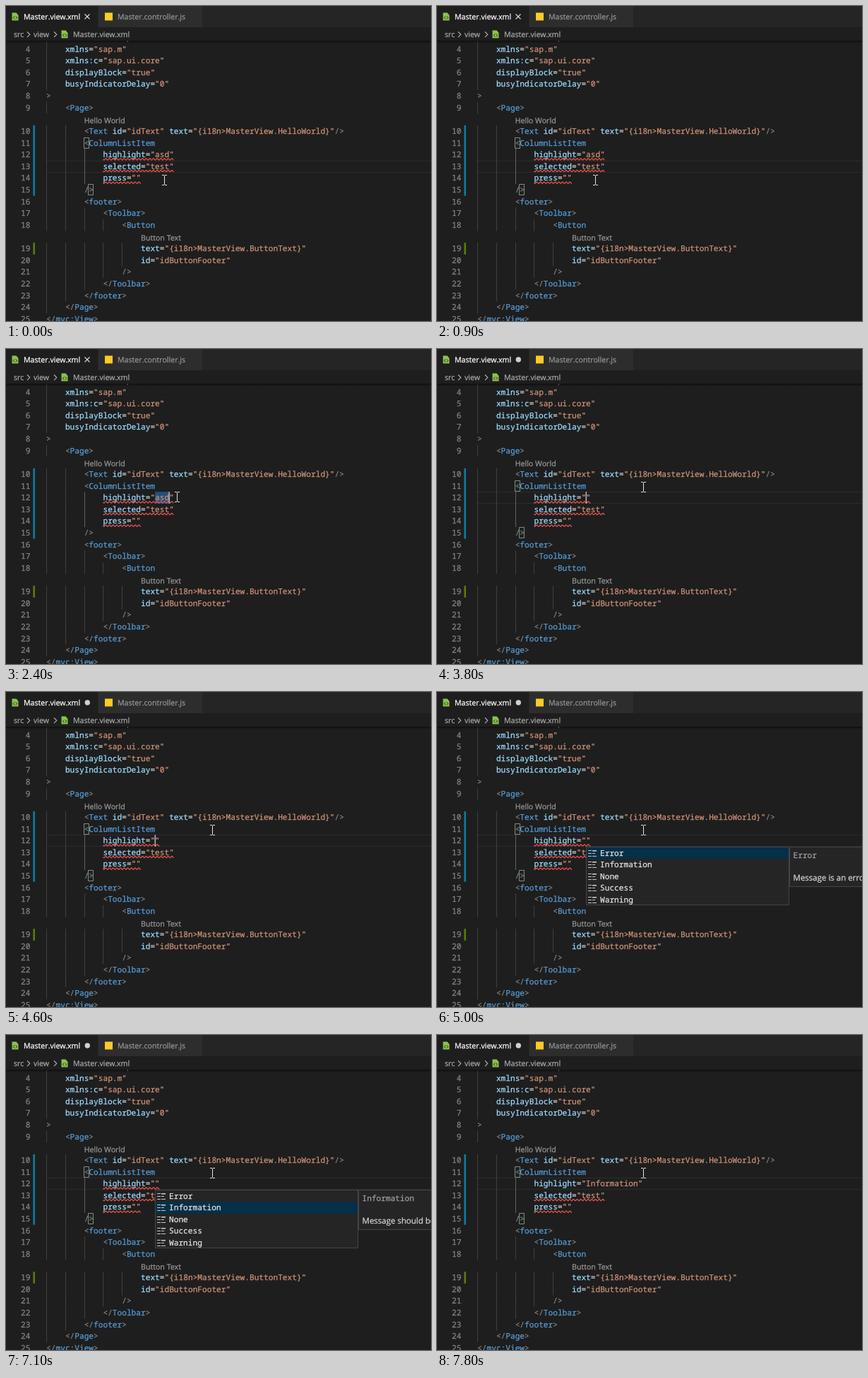
Animation, 602 px wide and 446 px high, one loop 8 s. Source, as an HTML page with a canvas:

```html
<!DOCTYPE html>
<html lang="en">
<head>
<meta charset="utf-8">
<style>
  html, body { margin: 0; width: 100%; height: 100%; overflow: hidden; background: #1e1e1e; }
  canvas { display: block; }
</style>
</head>
<body>
<canvas id="stage" width="602" height="446"></canvas>
<script>
const ctx = document.getElementById('stage').getContext('2d');
ctx.textRendering = 'geometricPrecision';
ctx.lineJoin = 'round';

const LOOP = 8000, LEFT = 57.1, CELL = 6.695, TOP = 52.5, ROW = 16.63;
const MONO = '11.16px "Noto Sans Mono", monospace';
const ui = size => `${size}px "Open Sans", sans-serif`;
const UI = ui(10.65);

// Times of the editing steps, in ms
const SELECT = 2100, ERASE = 2500, SUGGEST = 5000, NEXT = 6500, ACCEPT = 7200;

// Editor rows from line 3 on; "~" marks a code lens, which has no line number
const source = `
    xmlns:mvc="sap.ui.core.mvc"
    xmlns="sap.m"
    xmlns:c="sap.ui.core"
    displayBlock="true"
    busyIndicatorDelay="0"
>
    <Page>
        ~Hello World
        <Text id="idText" text="{i18n>MasterView.HelloWorld}"/>
        <ColumnListItem
            highlight="@"
            selected="test"
            press=""
        />
        <footer>
            <Toolbar>
                <Button
                    ~Button Text
                    text="{i18n>MasterView.ButtonText}"
                    id="idButtonFooter"
                />
            </Toolbar>
        </footer>
    </Page>
</mvc:View>`.slice(1).split('\n');

const options = ['Error', 'Information', 'None', 'Success', 'Warning'];
const details = ['Message is an error', 'Message should be highlighted'];
const pointerPath = [
  [0, 224, 246], [900, 224, 246], [1600, 244, 217], [2000, 223, 211],
  [2400, 242, 209], [2900, 292, 195], [LOOP, 292, 195]
];

const colX = col => LEFT + col * CELL;
const rowY = row => TOP + row * ROW;

function rect(x, y, w, h, color) {
  ctx.fillStyle = color;
  ctx.fillRect(x, y, w, h);
}

function frame(x, y, w, h, color) {
  ctx.strokeStyle = color;
  ctx.lineWidth = 1;
  ctx.strokeRect(x, y, w, h);
}

function line(points, color, width = 1) {
  ctx.beginPath();
  points.forEach(([x, y]) => ctx.lineTo(x, y));
  ctx.strokeStyle = color;
  ctx.lineWidth = width;
  ctx.stroke();
}

// A hairline outline gives the letters a slightly heavier weight
function text(str, x, y, color, font = MONO, align = 'left') {
  ctx.font = font;
  ctx.fillStyle = ctx.strokeStyle = color;
  ctx.textAlign = align;
  ctx.lineWidth = 0.25;
  ctx.fillText(str, x, y);
  ctx.strokeText(str, x, y);
}

function code(str, y) {
  for (const m of str.matchAll(/(<\/?)([\w:]*)|\/?>|"[^"]*"|=|[\w:.]+/g)) {
    const [token, open, tag] = m, x = colX(m.index);
    if (open) {
      text(open, x, y, '#808080');
      text(tag, colX(m.index + open.length), y, '#569cd6');
    } else {
      const color = token[0] === '"' ? '#ce9178' : token === '=' ? '#d4d4d4'
        : token.endsWith('>') ? '#808080' : '#9cdcfe';
      text(token, x, y, color);
    }
  }
}

function squiggle(row, cols) {
  const points = [], start = colX(12);
  for (let x = 0; x <= cols * CELL; x += 0.5)
    points.push([start + x, rowY(row) + 14.8 + 1.1 * Math.sin(x * Math.PI / 2.6)]);
  line(points, '#f0524a', 1.25);
}

function bracketBox(row, col) {
  const x = Math.round(colX(col)) - 0.5, y = Math.round(rowY(row)) + 0.5;
  rect(x, y, 7, 15, 'rgba(0,100,0,.1)');
  frame(x, y, 7, 15, '#888');
}

function editor(t) {
  const selecting = t >= SELECT && t < ERASE;
  const activeRow = t < SELECT ? 10 : 9;
  const value = t < ERASE ? 'asd' : t < ACCEPT ? '' : 'Information';

  if (selecting) {
    rect(colX(23), rowY(9), 3 * CELL, ROW, '#264f78');
  } else {
    const y = Math.round(rowY(activeRow));
    rect(56, y, 546, 1, '#2c2c2c');
    rect(56, y + 16, 546, 1, '#2c2c2c');
  }

  let number = 3;
  source.forEach((raw, i) => {
    const y = rowY(i - 1), indent = raw.search(/\S/);
    if (raw[indent] === '~') {
      text(raw.slice(indent + 1), colX(indent), y + 13.4, '#999', UI);
      return;
    }
    for (let col = 0; col < indent; col += 4) {
      const active = col === 8 && number > 11 && number < 15;
      rect(Math.round(colX(col)), y, 1, ROW, active ? '#606060' : '#404040');
    }
    text(number++, 34.4, y + 12, '#858585', MONO, 'right');
    code(raw.replace('@', value), y + 12);
  });

  rect(38.4, rowY(7), 2.6, 6 * ROW, '#0c7d9d');
  rect(38.4, rowY(17), 2.6, ROW, '#587c0c');

  if (t < ACCEPT) squiggle(9, 12 + value.length);
  squiggle(10, 15);
  squiggle(11, 8);
  if (!selecting) {
    bracketBox(8, 8);
    bracketBox(12, 9);
  }

  // The caret blinks every half second, restarting with each edit
  const since = t < SELECT ? 400 : t < ERASE ? SELECT : t < ACCEPT ? ERASE : ACCEPT;
  if (t >= since && (t - since) % 1000 < 500) {
    const col = t < SELECT ? 27 : 23 + value.length;
    rect(Math.round(colX(col)) - 0.5, rowY(activeRow), 1.6, ROW, '#aeafad');
  }
}

function fileIcon(x, y) {
  ctx.fillStyle = '#8bc34a';
  ctx.beginPath();
  ctx.moveTo(x, y);
  [[x + 6, y], [x + 9, y + 3.5], [x + 9, y + 11], [x, y + 11]].forEach(p => ctx.lineTo(...p));
  ctx.fill();
  line([[x + 3.6, y + 5], [x + 1.8, y + 7], [x + 3.6, y + 9]], '#1e1e1e');
  line([[x + 5.4, y + 5], [x + 7.2, y + 7], [x + 5.4, y + 9]], '#1e1e1e');
}

function header(t) {
  rect(0, 0, 602, 30, '#252526');
  rect(0, 0, 130, 30, '#1e1e1e');
  rect(131, 0, 147, 30, '#2d2d2d');
  rect(0, 30, 602, 19, '#1e1e1e');
  const shadow = ctx.createLinearGradient(0, 49, 0, 53);
  shadow.addColorStop(0, 'rgba(0,0,0,.5)');
  shadow.addColorStop(1, 'rgba(0,0,0,0)');
  rect(0, 49, 602, 4, shadow);

  fileIcon(8.5, 9.5);
  text('Master.view.xml', 25, 19, '#fff', UI);
  if (t < ERASE) {
    line([[111.5, 11.5], [118.5, 18.5]], '#ddd', 1.1);
    line([[118.5, 11.5], [111.5, 18.5]], '#ddd', 1.1);
  } else {
    ctx.beginPath();
    ctx.arc(115.3, 15, 3.7, 0, 7);
    ctx.fillStyle = '#d0d0d0';
    ctx.fill();
  }
  rect(140, 9.5, 11, 11, '#ffca28');
  text('Master.controller.js', 158, 19, '#969696', UI);

  text('src', 11, 44, '#a9a9a9', UI);
  text('view', 39, 44, '#a9a9a9', UI);
  text('Master.view.xml', 95, 44, '#a9a9a9', UI);
  for (const x of [30, 68]) line([[x, 36.5], [x + 3.8, 40.3], [x, 44.1]], '#b0b0b0', 1.2);
  fileIcon(78.5, 34.5);
}

function suggestions(picked) {
  const x = 211.5, y = 219.5;
  rect(x, y, 287, 82, '#252526');
  rect(x, y + picked * ROW, 287, ROW, '#062f4a');
  options.forEach((name, i) => {
    const top = Math.round(y + i * ROW);
    for (const dy of [4, 8, 12]) {
      rect(214, top + dy, 5, 1, '#c5c5c5');
      rect(220, top + dy, dy === 8 ? 4 : 6, 1, '#c5c5c5');
    }
    rect(220, top + 5, 6, 1, '#8a8a8a');
    text(name, 231, y + i * ROW + 12, '#e4e4e4');
  });
  frame(x, y, 287, 82, '#454545');

  rect(499.5, y, 110, 56, '#252526');
  frame(499.5, y, 110, 56, '#454545');
  text(options[picked], 504.5, 235, '#a0a0a0');
  text(details[picked], 504.5, 266.5, '#d4d4d4', ui(11.5));
}

function pointer(t) {
  const i = pointerPath.findIndex(p => p[0] > t);
  const [t0, x0, y0] = pointerPath[i - 1], [t1, x1, y1] = pointerPath[i];
  const u = (t - t0) / (t1 - t0), ease = u * u * (3 - 2 * u);
  const x = Math.round(x0 + (x1 - x0) * ease), y = Math.round(y0 + (y1 - y0) * ease);
  rect(x, y - 6, 1, 13, '#e4e4e4');
  for (const end of [y - 7, y + 7]) {
    rect(x - 3, end, 3, 1, '#e4e4e4');
    rect(x + 1, end, 3, 1, '#e4e4e4');
  }
}

function draw() {
  const t = Math.floor(performance.now() % LOOP / 100) * 100;
  rect(0, 0, 602, 446, '#1e1e1e');
  editor(t);
  header(t);
  if (t >= SUGGEST && t < ACCEPT) suggestions(t < NEXT ? 0 : 1);
  pointer(t);
  requestAnimationFrame(draw);
}
draw();
</script>
</body>
</html>
```
